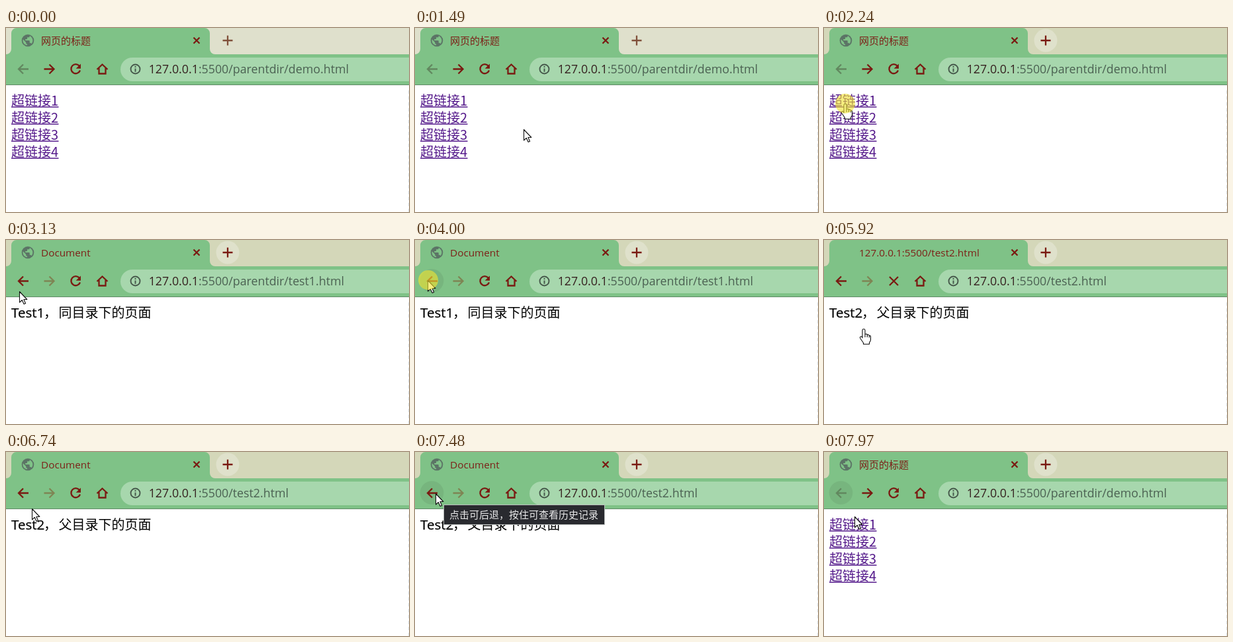
Write an HTML page that moves like this. It is 609 px wide and 280 px high and loops after 8000 ms.

```html
<!DOCTYPE html>
<html lang="zh-CN">
<head>
<meta charset="utf-8">
<title>Link navigation demo</title>
<style>
  html, body { margin: 0; width: 100%; height: 100%; overflow: hidden; background: #fff; }
  svg { display: block; width: 609px; height: 280px; }
  text { font-family: "Open Sans", "Noto Sans CJK SC", "Noto Sans CJK", sans-serif; white-space: pre; }
  .cjk { font-family: "Noto Sans CJK SC", "Noto Sans CJK", sans-serif; font-weight: 350; }
  .icon { fill: none; stroke: #7a1a12; stroke-width: 2.3; }
  .link { fill: #551a8b; }
  .link.active { fill: #ee1111; }
  .pointer { fill: #fff; stroke: #111; stroke-width: 1.1; stroke-linejoin: round; }
</style>
</head>
<body>
<svg viewBox="0 0 609 280">
  <rect width="609" height="280" fill="#fff"/>
  <path d="M608.5 95V280" stroke="#dde3e8" stroke-dasharray="5 4"/>

  <!-- tab strip -->
  <rect id="strip" width="609" height="41"/>
  <path d="M0 40A8 8 0 0 0 8 32V8A8 8 0 0 1 16 0H300A8 8 0 0 1 308 8V32A8 8 0 0 0 316 40Z" fill="#7fc287"/>
  <g id="globe">
    <circle cx="33" cy="19" r="9.3" fill="#5c7466"/>
    <path transform="translate(21.800 7.800) scale(.93)" fill="#7fc287" d="M11 19.900C7 19.400 4 16.100 4 12Q4 11.100 4.200 10.200L9 15V16Q9 18 11 18ZM17.900 17.400Q17.400 16 16 16H15V13Q15 12 14 12H8V10H10Q11 10 11 9V7H13Q15 7 15 5V4.600A8 8 0 0 1 17.900 17.400Z"/>
  </g>
  <text id="title" x="53" y="24.5" fill="#7d2018"></text>
  <path class="icon" d="M283.5 14.5l9 9m0-9l-9 9"/>
  <circle id="newTab" cx="335" cy="19" r="17.5" fill="#dfe1cb"/>
  <path id="plus" class="icon" d="M327.5 19h15m-7.5-7.5v15"/>

  <!-- toolbar -->
  <rect y="40" width="609" height="46" fill="#7fc287"/>
  <rect y="86" width="609" height="1" fill="#5f8a67"/>
  <circle id="hover" cx="25.5" cy="62" r="17.8" fill="#77b57e"/>
  <path id="back" class="icon" d="M34 62.5H19m7-7l-7 7 7 7"/>
  <path id="forward" class="icon" d="M57.5 62.5h15m-7-7l7 7-7 7"/>
  <g id="reload">
    <path class="icon" d="M111 58a7 7 0 1 0 1 6.5"/>
    <path d="M113 54.5v7.3h-7.3z" fill="#7a1a12"/>
  </g>
  <path id="stop" class="icon" d="M99 56l13 13m0-13l-13 13"/>
  <path class="icon" d="M137.5 63l8-7.5 8 7.5M140.5 61v8.500h10V61"/>
  <rect x="173" y="45" width="460" height="36" rx="18" fill="#a7d7ad"/>
  <g fill="none" stroke="#46584b" stroke-width="1.9">
    <circle cx="195.5" cy="62.5" r="7"/>
    <path d="M195.5 58v2m0 1.6v5.2"/>
  </g>
  <text x="215.7" y="69" font-size="17.8" fill="#4b6152"><tspan fill="#35201f">127.0.0.1</tspan><tspan id="path"></tspan></text>

  <!-- page -->
  <g id="links"></g>
  <g id="article" font-size="20">
    <text id="name" x="8" y="118" font-size="20.5" stroke="#000" stroke-width=".25"></text>
    <text id="body" class="cjk" x="57 79.500" y="118"></text>
  </g>

  <g id="tip">
    <rect x=".5" y=".5" width="243" height="30" fill="#292a2f" stroke="#b9bdbb"/>
    <text class="cjk" x="9" y="20.5" font-size="15" fill="#e9e9ea">点击可后退，按住可查看历史记录</text>
  </g>
  <g id="cursor">
    <path id="arrow" class="pointer" d="M-.5.5V17l3.8-3.6 2.8 6.2 2.5-1.1-2.7-6H10.800Z"/>
    <path id="hand" class="pointer" d="M-2 14V2.3Q-2 .5 0 .5T2 2.3V8.5Q5 7.3 5.3 9.3 8 8.6 8.3 10.5 10.5 10.2 10.5 12.3V17Q10.5 19 8.5 21V23.5H-.5V21.5L-5 15Q-6.3 12.8-4.5 12T-2 14ZM2 8.5V13M5.3 9.3V13M8.3 10.5V13.5"/>
  </g>
  <circle id="click" r="15" fill="#f0e432" fill-opacity=".62"/>
</svg>
<script>
const LOOP = 8000, STEP = 69.5;
const $ = id => document.getElementById(id);
const show = (id, on) => { $(id).style.display = on ? "" : "none"; };
const within = (t, spans) => spans.some(([a, b]) => t >= a && t < b);

const pages = {
  demo:  { title: "网页的标题", path: ":5500/parentdir/demo.html" },
  test1: { title: "Document", path: ":5500/parentdir/test1.html", name: "Test1", body: "，同目录下的页面" },
  test2: { title: "Document", path: ":5500/test2.html", name: "Test2", body: "，父目录下的页面" }
};
const visits = [[0, "demo"], [2450, "test1"], [4130, "demo"], [5920, "test2"], [7690, "demo"]];
const loading = [[2450, 2520], [5920, 6060]];
const tips = [[3930, 4000], [7480, 7550]];
const clicks = [[2240, 2310], [4000, 4070], [5700, 5770], [7550, 7620]];
const pressed = [[[2310, 2450]], [[5770, 5920]], [], []];

// start, steps, then a quadratic curve: from, control, to
const moves = [
  [1140, 11, 409, 230, 110, 135, 32, 115],
  [2920, 7, 30, 110, 17, 70, 20, 61],
  [4200, 13, 22, 66, 63, 136, 60, 135],
  [6460, 8, 56, 127, 40, 85, 32, 63],
  [7760, 4, 33, 66, 40, 82, 47, 98]
];

for (let i = 0; i < 4; i++) {
  const y = 118 + 26 * i;
  $("links").insertAdjacentHTML("beforeend",
    `<g class="link"><text class="cjk" x="8" y="${y}" font-size="20">超链接${i + 1}</text>
     <rect x="8" y="${y + 1.5}" width="71.5" height="1.5"/></g>`);
}
const links = [...$("links").children];

function pointerAt(t) {
  const move = moves.filter(m => m[0] <= t).pop();
  if (!move) return null;
  const [start, steps, x0, y0, cx, cy, x1, y1] = move;
  const p = Math.min(1, Math.floor((t - start) / STEP) / (steps - 1)), q = 1 - p;
  const curve = (a, b, c) => Math.round(q * q * a + 2 * p * q * b + p * p * c);
  return [curve(x0, cx, x1), curve(y0, cy, y1)];
}

function hoverAt(t) {
  if (t >= 6880) return 1;
  if (t < 3200 || t > 4560) return 0;
  return Math.min(1, (t - 3200) / 140, (4560 - t) / 220);
}

function drawChrome(t, key) {
  const page = pages[key], busy = within(t, loading), home = key === "demo";
  const focused = t >= 2240;
  $("strip").setAttribute("fill", focused ? "#d4d7b9" : "#dfe0cc");
  show("newTab", focused);
  $("plus").style.stroke = focused ? "#7a1a12" : "#80503a";
  show("globe", !busy);
  show("reload", !busy);
  show("stop", busy);
  $("title").textContent = busy ? "127.0.0.1" + page.path : page.title;
  $("title").setAttribute("font-size", home ? 15 : 15.3);
  $("title").setAttribute("class", home ? "cjk" : "");
  $("path").textContent = page.path;
  $("back").style.stroke = home ? "#62875f" : "";
  $("forward").style.stroke = home ? "" : "#7f8554";
  $("hover").style.opacity = hoverAt(t);
}

function drawPage(t, key) {
  const home = key === "demo";
  show("links", home);
  show("article", !home);
  $("name").textContent = pages[key].name || "";
  $("body").textContent = pages[key].body || "";
  links.forEach((link, i) => link.classList.toggle("active", within(t, pressed[i])));
}

function drawPointer(t) {
  const at = pointerAt(t);
  show("cursor", at);
  show("tip", within(t, tips));
  show("click", within(t, clicks));
  if (!at) return;
  const [x, y] = at;
  const hand = x < 80 && y >= 100 && within(t, [[1140, 2920], [4200, 6460]]);
  show("hand", hand);
  show("arrow", !hand);
  $("cursor").setAttribute("transform", `translate(${x} ${y})`);
  $("click").setAttribute("transform", `translate(${x} ${y})`);
  $("tip").setAttribute("transform", `translate(${x + 11} ${y + 17})`);
}

function draw(t) {
  const key = visits.filter(v => v[0] <= t).pop()[1];
  drawChrome(t, key);
  drawPage(t, key);
  drawPointer(t);
}

const origin = performance.now();
function tick() {
  draw((performance.now() - origin) % LOOP);
  requestAnimationFrame(tick);
}
tick();
</script>
</body>
</html>
```
